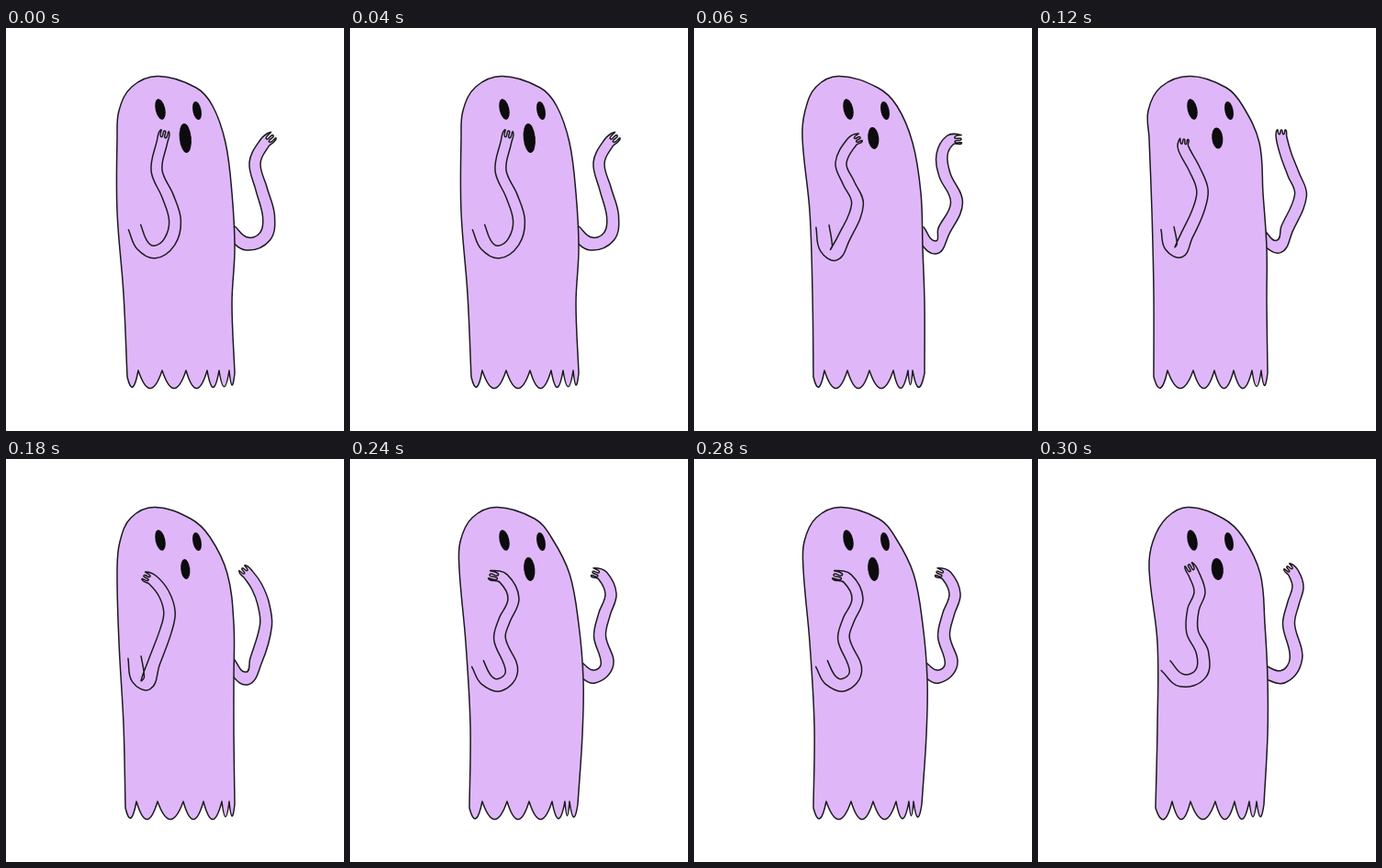
An HTML page with a canvas that plays this animation: 368x439 px, repeating every 360 ms.

```html
<!DOCTYPE html>
<html lang="en">
<head>
<meta charset="utf-8">
<title>Waving ghost</title>
<style>
html, body { margin: 0; height: 100%; overflow: hidden; background: #fff; }
canvas { display: block; }
</style>
</head>
<body>
<canvas id="stage" width="368" height="439"></canvas>
<script>
const ctx = document.getElementById('stage').getContext('2d');
const HOLD = 60;
// Heights at which each body outline gives its x, from left foot over the head to right foot.
const ROWS = [380, 290, 200, 120, 90, 64, 52.5, 65, 85, 125, 180, 240, 300, 376];

const pairs = a => a.flatMap((x, i) => i % 2 ? [] : [[x, a[i + 1]]]);

// Unit tangent at point i.
function tangent(points, i) {
  const a = points[Math.max(i - 1, 0)], b = points[Math.min(i + 1, points.length - 1)];
  const dx = b[0] - a[0], dy = b[1] - a[1], d = Math.hypot(dx, dy) || 1;
  return [dx / d, dy / d];
}

// Smooth curve through points; handles scale with segment length.
function smooth(points) {
  const path = new Path2D();
  path.moveTo(...points[0]);
  for (let i = 0; i + 1 < points.length; i++) {
    const [x, y] = points[i], [X, Y] = points[i + 1];
    const h = Math.hypot(X - x, Y - y) * 0.36;
    const u = tangent(points, i), v = tangent(points, i + 1);
    path.bezierCurveTo(x + u[0] * h, y + u[1] * h, X - v[0] * h, Y - v[1] * h, X, Y);
  }
  return path;
}

// Outline from xs, closed by scallops hanging between the notches.
function makeBody(xs, notches) {
  const points = xs.map((x, i) => [x, ROWS[i]]), path = smooth(points);
  const edge = [points.at(-1), ...notches.map(x => [x, 373]), points[0]];
  for (let i = 0; i + 1 < edge.length; i++) {
    const [ax, ay] = edge[i], [bx, by] = edge[i + 1];
    const tip = 387 + Math.min(5.5, (ax - bx) / 3);
    path.quadraticCurveTo((ax + bx) / 2, 2 * tip - (ay + by) / 2, bx, by);
  }
  return path;
}

// Tube around a centre line; the last point is where the fingers end.
function makeArm(coords) {
  const points = pairs(coords), [ex, ey] = points.at(-1);
  const spine = points.slice(0, -1), last = spine.length - 1, [wx, wy] = spine[last];
  const side = s => spine.map(([x, y], i) => {
    const [u, v] = tangent(points, i), w = s * (7.2 - 1.4 * i / last);
    return [x - v * w, y + u * w];
  });
  const [u, v] = tangent([[wx, wy], [ex, ey]], 0);
  const fingers = [-2, -1, 0, 1, 2].map(k => {
    const reach = k % 2 ? 0.4 : 1, w = k * 2.3;
    return [wx + (ex - wx) * reach - v * w, wy + (ey - wy) * reach + u * w];
  });
  return smooth([...side(-1), ...fingers, ...side(1).reverse()]);
}

const poses = [];
function pose(body, notches, front, back, mouth) {
  poses.push({ parts: [makeArm(back), makeBody(body, notches), makeArm(front)], mouth });
}

pose([132, 128, 121, 121, 123, 137, 166, 207, 225, 239, 246, 249, 246, 249],
  [243, 232, 219, 196, 170, 144],
  [140,217, 148,236, 162,244, 178,233, 184,210, 176,183, 164,155, 170,124, 173,112],
  [245,222, 262,235, 282,227, 286,205, 278,175, 271,147, 281,126, 291,117],
  [6.5, 16]);
pose([130, 129, 126, 118, 121, 133, 158, 200, 221, 238, 247, 249, 251, 251],
  [238, 233, 217, 191, 167, 142],
  [140,216, 144,240, 152,247, 163,229, 178,192, 168,168, 160,147, 172,124, 181,119],
  [245,222, 263,239, 272,221, 286,190, 273,160, 270,138, 279,122, 291,121],
  [6, 12]);
pose([126, 126, 124, 121, 120, 134, 166, 205, 223, 241, 245, 249, 249, 250],
  [243, 233, 213, 192, 169, 141],
  [141,218, 145,238, 153,244, 162,226, 174,200, 179,177, 170,153, 158,130, 159,121],
  [244,228, 262,238, 271,219, 286,182, 278,159, 270,138, 265,119, 265,111],
  [6, 11.5]);
pose([130, 128, 123, 121, 124, 136, 162, 201, 222, 241, 248, 248, 248, 249],
  [243, 235, 215, 193, 165, 142],
  [140,216, 144,240, 152,246, 161,222, 174,187, 178,167, 172,147, 160,132, 150,127],
  [244,224, 262,239, 272,220, 283,181, 280,157, 273,139, 264,126, 257,119],
  [5, 11]);
pose([130, 131, 126, 119, 120, 133, 160, 201, 219, 239, 249, 254, 253, 248],
  [239, 234, 220, 195, 171, 144],
  [139,223, 148,240, 163,246, 176,231, 163,196, 168,176, 178,152, 167,130, 152,126],
  [249,228, 266,237, 280,224, 272,193, 277,169, 284,147, 275,127, 264,123],
  [6, 13]);
pose([128, 130, 130, 121, 125, 140, 164, 202, 223, 242, 247, 250, 250, 246],
  [238, 230, 214, 193, 166, 146],
  [139,225, 156,241, 177,234, 179,211, 168,188, 169,164, 176,145, 170,126, 164,115],
  [244,231, 267,237, 281,217, 273,180, 278,157, 283,139, 278,124, 271,117],
  [6.5, 12]);

function paint(path) {
  ctx.fillStyle = '#dfb7f9';
  ctx.fill(path);
  ctx.stroke(path);
}

function hole(x, y, rx, ry, tilt) {
  ctx.fillStyle = '#0c0b0d';
  ctx.beginPath();
  ctx.ellipse(x, y, rx, ry, tilt, 0, 2 * Math.PI);
  ctx.fill();
}

function draw({ parts: [back, body, front], mouth }) {
  ctx.fillStyle = '#fff';
  ctx.fillRect(0, 0, 368, 439);
  ctx.strokeStyle = '#1c1a1e';
  ctx.lineWidth = 1.5;
  ctx.lineCap = ctx.lineJoin = 'round';
  paint(back);
  paint(body);
  hole(168, 88.5, 5.3, 11.5, -0.22);
  hole(208, 90, 4.6, 10.2, -0.2);
  hole(195.3, 120, ...mouth, -0.1);
  paint(front);
}

const start = performance.now();
function tick() {
  const t = performance.now() - start;
  draw(poses[Math.floor(t / HOLD) % poses.length]);
  requestAnimationFrame(tick);
}
tick();
</script>
</body>
</html>
```
